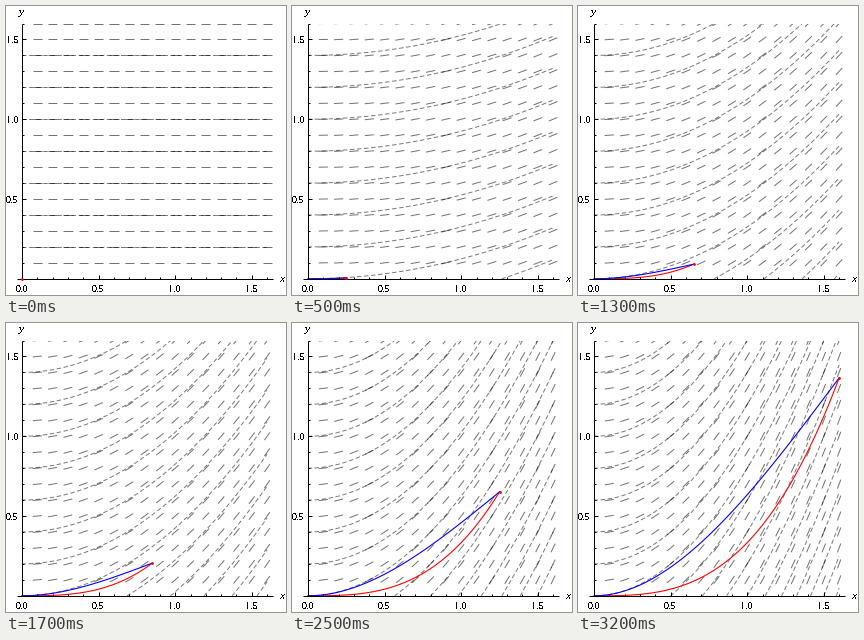
Write a matplotlib script that moves like this. It is 280 px wide and 289 px high and loops after 4700 ms.

```python
import numpy as np
import matplotlib.pyplot as plt
from matplotlib.animation import FuncAnimation
from matplotlib.collections import LineCollection
from matplotlib.patches import Rectangle

W, H, DPI = 280, 289, 100
PX = 72 / DPI              # one pixel in points
X0, Y0 = 16, 272.8         # plot origin on the stage
SX, SY = 153.2, 159.55     # pixels per unit
STEP, MOVES, FRAMES = 0.05, 32, 47
SPAN = 1.6
DASH = 0.03                # half length of a field dash

fig = plt.figure(figsize=(W / DPI, H / DPI), dpi=DPI, facecolor="white")
ax = fig.add_axes([0, 0, 1, 1])
ax.set_xlim(0, W)
ax.set_ylim(H, 0)
ax.axis("off")


def to_px(x, y):
    return np.stack([X0 + SX * np.asarray(x), Y0 - SY * np.asarray(y)], axis=-1)


def add_lines(segs, width, **style):
    lines = LineCollection(segs, linewidths=width * PX, **style)
    ax.add_collection(lines, autolim=False)
    return lines


def label(x, y, text, size, ha="center", **font):
    ax.text(x, y, text, ha=ha, va="baseline", size=size * PX,
            family="Liberation Serif", antialiased=False, **font)


def draw_axes():
    segs = [[(11, Y0), (267, Y0)], [(X0, 18), (X0, 273)]]
    for i in range(17):
        size = 4 if i % 5 == 0 else 2
        x, y = to_px(i / 10, i / 10)
        segs.append([(x, Y0), (x, Y0 - size)])
        segs.append([(X0, y), (X0 + size, y)])
    add_lines(segs, 1, colors="black", zorder=6)

    for v in (0, 0.5, 1, 1.5):
        x, y = to_px(v, v)
        label(x - 0.5, 286, f"{v:.1f}", 10)
        if v:
            label(12.5, y + 3.5, f"{v:.1f}", 10, ha="right")
    label(276.5, 275.5, "x", 11.5, style="italic")
    label(16, 9, "y", 11.5, style="italic")


def field(t):
    """Short dashes along the velocity (1, x t) on a 0.1 grid."""
    ticks = np.arange(1, 17) / 10
    gx, gy = (g.ravel() for g in np.meshgrid(ticks, ticks))
    angle = np.arctan(gx * t)
    dx, dy = DASH * np.cos(angle), DASH * np.sin(angle)
    return np.stack([to_px(gx - dx, gy - dy), to_px(gx + dx, gy + dy)], axis=1)


def streamlines(t):
    """Curves y = c + t x^2 / 2, kept inside the plot."""
    curves = []
    for c in np.arange(-10, 8) / 5:
        if c < 0 and c + t * SPAN**2 / 2 <= 0:
            continue
        start = np.sqrt(-2 * c / t) if c < 0 else 0
        end = min(SPAN, np.sqrt(2 * (SPAN - c) / t)) if t else SPAN
        if end > start:
            x = np.linspace(start, end, 2 if t == 0 else 80)
            curves.append(to_px(x, c + t * x**2 / 2))
    return curves


draw_axes()
window = Rectangle((0, 18), W, 255, transform=ax.transData)
dashes = add_lines([], 1, colors=(0, 0, 0, 0.55), zorder=1)
streams = add_lines([], 1, colors=(0, 0, 0, 0.52), zorder=2,
                    linestyles=[(0.5, (4.5, 2.57))])
for part in (dashes, streams):
    part.set_clip_path(window)

path, = ax.plot([], [], color="red", lw=1.1 * PX, zorder=4)
streak, = ax.plot([], [], color="blue", lw=1.1 * PX, zorder=5)
dot, = ax.plot([], [], "o", color="red", ms=2.8 * PX, mew=0, zorder=7)


def update(i):
    t = min(i, MOVES) * STEP
    dashes.set_segments(field(t))
    streams.set_segments(streamlines(t))
    s = np.linspace(0, t, 100)
    path.set_data(*to_px(s, s**3 / 3).T)
    # particles released from the origin at time s
    streak.set_data(*to_px(t - s, t**3 / 3 - s * t**2 / 2 + s**3 / 6).T)
    dot.set_data(*to_px([t], [t**3 / 3]).T)
    return dashes, streams, path, streak, dot


anim = FuncAnimation(fig, update, frames=FRAMES, interval=100,
                     repeat=True, repeat_delay=0, blit=False)
plt.show()
```
